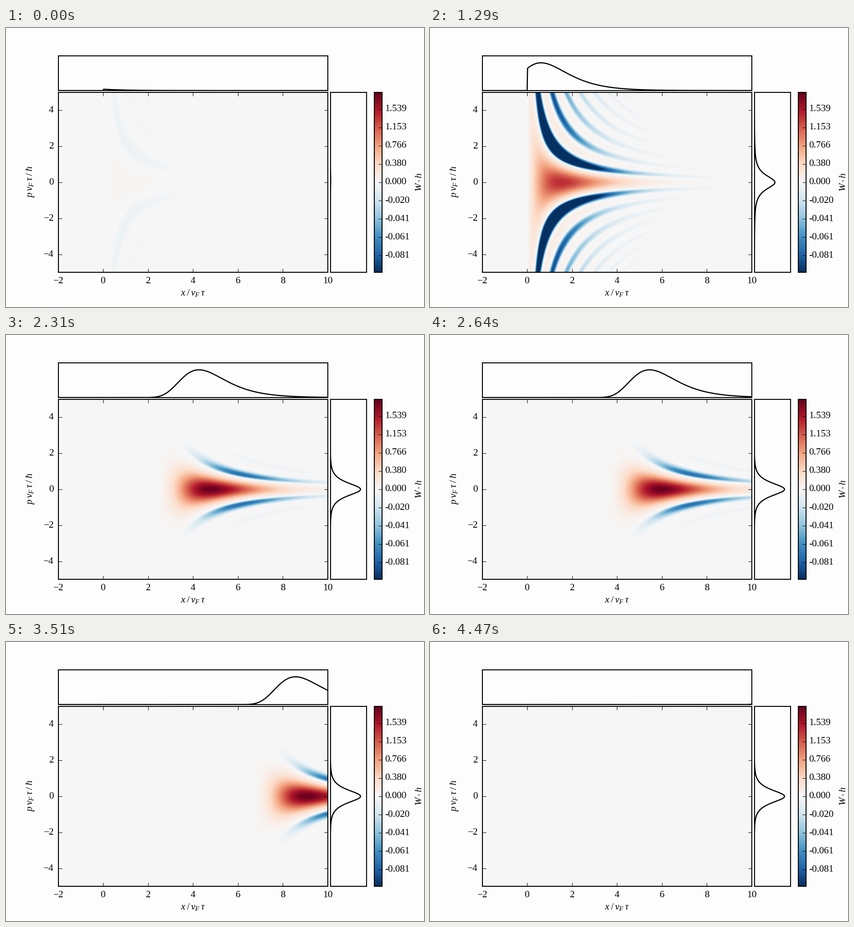
Animation, 917 px wide and 611 px high, one loop 4.5 s. Source, as a matplotlib script:

```python
import numpy as np
import matplotlib.pyplot as plt
from matplotlib.animation import FuncAnimation

W, H, DPI = 917, 611, 128
PX = 72 / DPI                     # points per pixel
FRAMES, INTERVAL = 150, 30
T_START, T_END = -4.0, 12.0
NEG_MAX, POS_MAX = 0.1, 1.88      # colour scale limits below and above zero
PAPER = "#fdfdfd"
LEFT, RIGHT, TOP, BOTTOM = 114.5, 706, 141, 535   # main panel, pixels

plt.rcParams.update({
    "font.family": "Liberation Serif",
    "font.size": 21.2 * PX,
    "mathtext.fontset": "custom",
    "mathtext.rm": "Liberation Serif",
    "mathtext.it": "Liberation Serif:italic",
    "mathtext.fallback": "stix",
    "axes.linewidth": 2.1 * PX,
})

fig = plt.figure(figsize=(W / DPI, H / DPI), dpi=DPI, facecolor=PAPER)
cmap = plt.get_cmap("RdBu_r")


def panel(left, top, right, bottom, xlim, ylim, color=PAPER):
    """Axes placed by pixel edges, measured from the top left corner."""
    ax = fig.add_axes([left / W, 1 - bottom / H, (right - left) / W, (bottom - top) / H])
    ax.set(xlim=xlim, ylim=ylim, xticks=[], yticks=[], facecolor=color)
    return ax


def label(x, y, text, ha="center", va="baseline", rotation=0):
    fig.text(x / W, 1 - y / H, text, ha=ha, va=va, rotation=rotation)


# Emission at x = 0 with a rate growing as exp(t): the packet is a Gumbel shape
# moving right, cut off at x < 0.
dx = 0.02
x = np.arange(501) * dx
p = np.linspace(0, 5, 151)
dp = p[1] - p[0]
p_full = np.concatenate([-p[:0:-1], p])

weights = np.tril(np.ones((x.size, x.size)))   # |y| < x, trapezoid rule
weights[np.diag_indices(x.size)] *= 0.5
weights[:, 0] *= 0.5
weights[0] = 0
weights = (4 * dx * weights).astype(np.float32)
cosh_y = np.cosh(x).astype(np.float32)
cos_yp = np.cos(2 * np.outer(x, p)).astype(np.float32)

x_long = np.arange(0, 34, 0.04)
waves = np.exp(-1j * np.outer(x_long, p)) * 0.04
waves[0] *= 0.5


def density(pos, t):
    u = pos - t
    return np.exp(-u - np.exp(-u))


def wigner(t):
    u = (x - t).astype(np.float32)[:, None]
    half = (weights * np.exp(-u - np.exp(-u) * cosh_y)) @ cos_yp
    return np.concatenate([half[:, :0:-1], half], axis=1).T


def momentum(t):
    half = np.abs(np.sqrt(density(x_long, t)) @ waves) ** 2
    return np.concatenate([half[:0:-1], half])


def to_scale(w):
    return np.clip(np.where(w < 0, w / NEG_MAX, w / POS_MAX), -1, 1)


main = panel(LEFT, TOP, RIGHT, BOTTOM, (-2, 10), (-5, 5), cmap(0.5))
upper = panel(LEFT, 61, RIGHT, 137, (-2, 10), (0, 1.25 * np.exp(-1)))
side = panel(711.5, TOP, 791, BOTTOM, (0, 1.2 * 2 * np.pi), (-5, 5))
bar = panel(808, TOP, 824.5, BOTTOM, (0, 1), (0, 1))

main.set_xticks(range(-2, 11, 2))
main.set_yticks(range(-4, 5, 2))
tick_style = dict(direction="in", length=8.3 * PX, width=1.05 * PX)
main.tick_params(top=True, right=True, labelbottom=False, labelleft=False, **tick_style)

image = main.imshow(np.zeros((p_full.size, x.size)), cmap=cmap, vmin=-1, vmax=1,
                    origin="lower", aspect="auto", interpolation="bilinear",
                    extent=(-dx / 2, 10 + dx / 2, -5 - dp / 2, 5 + dp / 2))
main.set(xlim=(-2, 10), ylim=(-5, 5))

curve = dict(color="black", lw=2.5 * PX, solid_joinstyle="round")
upper_line, = upper.plot([], [], **curve)
side_line, = side.plot([], [], **curve)

bar.imshow(np.linspace(0, 1, 256)[:, None], cmap=cmap, origin="lower",
           aspect="auto", extent=(0, 1, 0, 1))
bar_labels = ["-0.081", "-0.061", "-0.041", "-0.020", "0.000",
              "0.380", "0.766", "1.153", "1.539"]
bar_ticks = 0.5 + np.arange(-4, 5) * 26 / 256
bar.yaxis.tick_right()
bar.set_yticks(bar_ticks)
bar.tick_params(labelright=False, **tick_style)
for pos, text in zip(bar_ticks, bar_labels):
    label(831, BOTTOM - (BOTTOM - TOP) * pos + 4.5, text, ha="left")

for v in range(-2, 11, 2):
    label(LEFT + (v + 2) * (RIGHT - LEFT) / 12, 559, f"${v}$")
for v in range(-4, 5, 2):
    label(105.5, (TOP + BOTTOM) / 2 - v * (BOTTOM - TOP) / 10 + 5, f"${v}$", ha="right")
label(411, 586, r"$x\:/\:v_F\:\tau$")
label(53.5, 337, r"$p\:v_F\:\tau\:/\:ħ$", va="center", rotation=90)
label(907, 337, r"$W\cdot h$", va="center", rotation=90)

x_curve = np.concatenate([[-2], x])


def update(k):
    t = T_START + (T_END - T_START) * k / (FRAMES - 1)
    image.set_data(to_scale(wigner(t)))
    n = density(x, t)
    n[0] = 0
    upper_line.set_data(x_curve, np.concatenate([[0], n]))
    side_line.set_data(momentum(t), p_full)
    return image, upper_line, side_line


anim = FuncAnimation(fig, update, frames=FRAMES, interval=INTERVAL,
                     repeat=True, repeat_delay=0, blit=False)
plt.show()
```
